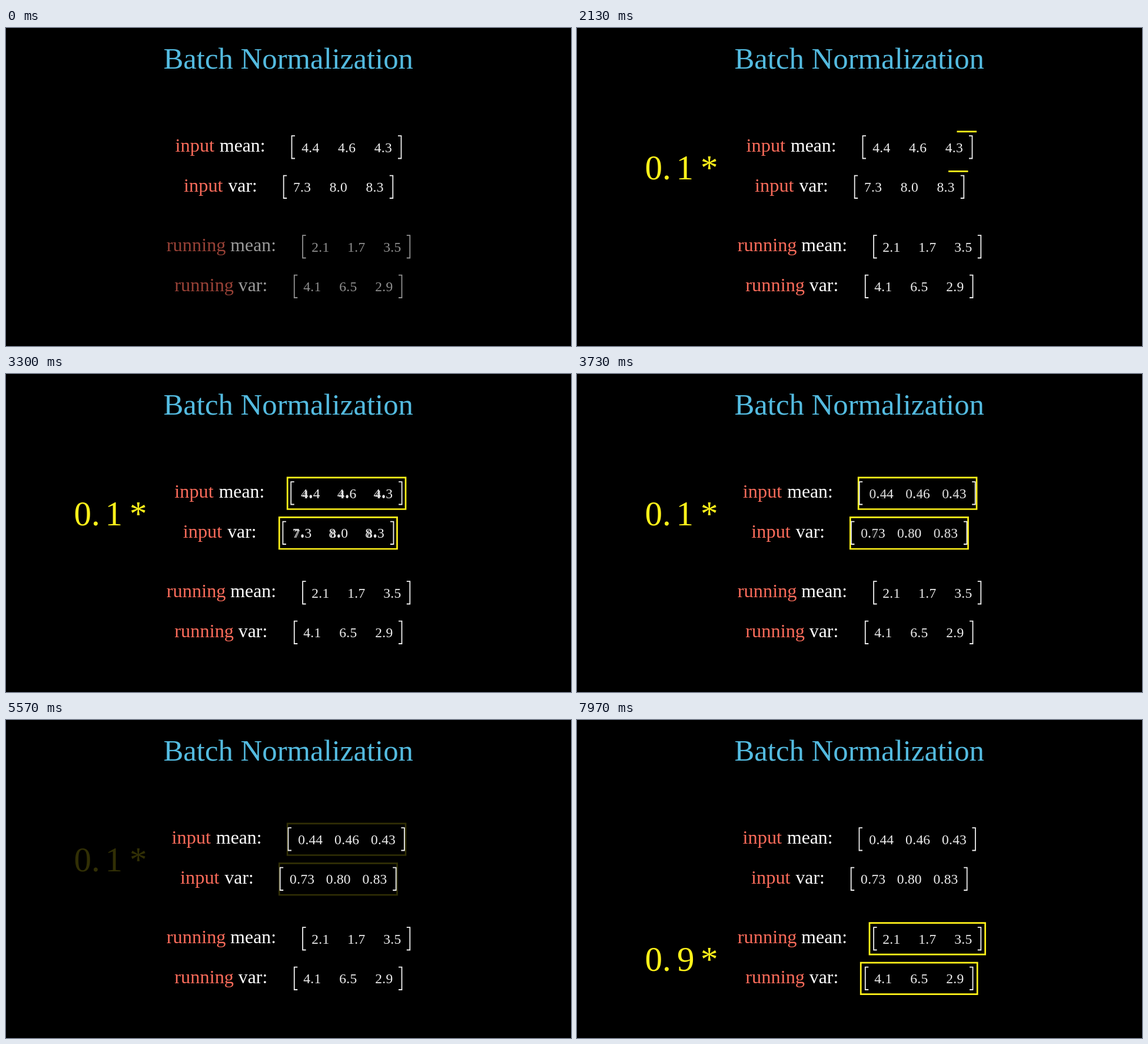
An HTML page with a canvas for the animation above (8 s loop, 960x540 px).

```html
<!DOCTYPE html>
<html lang="en">
<head>
<meta charset="utf-8">
<title>Batch Normalization</title>
<style>
  html, body { margin: 0; width: 100%; height: 100%; overflow: hidden; background: #000; }
  canvas { display: block; width: 960px; height: 540px; }
</style>
</head>
<body>
<canvas id="stage" width="960" height="540"></canvas>
<script>
const ctx = document.getElementById('stage').getContext('2d');
const LOOP = 8000;
const SERIF = '"Liberation Serif", "Times New Roman", serif';
const BLUE = '#54bbe0', RED = '#fa6b5a', YELLOW = '#fff21a', WHITE = '#fff', PALE = '#eee';
const EM = 23.5, DIGIT = EM * 0.5, DOT = EM * 0.278;

// Start times of the one-second animations
const BRIGHTEN = -70, SHOW_01 = 930, FRAME_INPUT = 1930, SCALE_INPUT = 2930,
      HIDE_01 = 4930, SHOW_09 = 5945, FRAME_RUNNING = 6930;

const inputRows = [
  { x: 287.5, y: 210, label: 'mean:', left: 484.6, right: 672.4, first: 517.2, step: 61.8,
    values: ['4.4', '4.6', '4.3'], scaled: ['0.44', '0.46', '0.43'],
    frame: [478.2, 175.8, 679, 229.5] },
  { x: 302, y: 277.5, label: 'var:', left: 470.8, right: 658.2, first: 503, step: 61.7,
    values: ['7.3', '8.0', '8.3'], scaled: ['0.73', '0.80', '0.83'],
    frame: [464.3, 243.3, 664.5, 297] }
];
const runningRows = [
  { x: 272.8, y: 379, label: 'mean:', left: 503.2, right: 687.2, first: 534.3, step: 61,
    values: ['2.1', '1.7', '3.5'], frame: [497, 344.6, 693.6, 398.2] },
  { x: 286.3, y: 446.5, label: 'var:', left: 488.9, right: 673.4, first: 520.2, step: 61,
    values: ['4.1', '6.5', '2.9'], frame: [482.2, 412.2, 680.2, 465.6] }
];

const lerp = (a, b, k) => a + (b - a) * k;
const sigmoid = x => 1 / (1 + Math.exp(-x));

// Sigmoid ease over one second, normalised to reach 0 and 1
function ease(time, start) {
  const u = Math.min(1, Math.max(0, (time - start) / 1000));
  const edge = sigmoid(-5);
  return Math.min(1, Math.max(0, (sigmoid(10 * (u - 0.5)) - edge) / (1 - 2 * edge)));
}

function text(str, x, y, size, color, align = 'left') {
  ctx.font = `${size}px ${SERIF}`;
  ctx.textAlign = align;
  ctx.fillStyle = color;
  ctx.fillText(str, x, y);
}

// Splits a number into glyphs with their centre positions
function layout(str, center) {
  const widths = [...str].map(ch => ch === '.' ? DOT : DIGIT);
  let x = center - widths.reduce((a, b) => a + b) / 2;
  return [...str].map((ch, i) => {
    x += widths[i];
    return { ch, x: x - widths[i] / 2 };
  });
}

function number(str, center, y) {
  for (const g of layout(str, center)) text(g.ch, g.x, y, EM, PALE, 'center');
}

const glyphBox = ch => ch === '.' ? { w: 2.6, h: 2.6 } : { w: 10.6, h: 15.6 };

function morphGlyph(from, to, y, k) {
  const a = glyphBox(from.ch), b = glyphBox(to.ch);
  const w = lerp(a.w, b.w, k), h = lerp(a.h, b.h, k), x = lerp(from.x, to.x, k);
  const draw = (ch, box, alpha) => {
    ctx.save();
    ctx.globalAlpha *= alpha;
    ctx.translate(x, y);
    ctx.scale(w / box.w, h / box.h);
    text(ch, 0, 0, EM, PALE, 'center');
    ctx.restore();
  };
  if (from.ch === to.ch) return draw(from.ch, a, 1);
  draw(from.ch, a, 1 - k * k);
  draw(to.ch, b, k * k);
}

function morphNumber(before, after, center, y, k) {
  const a = layout(before, center), b = layout(after, center);
  b.forEach((to, i) => morphGlyph(a[Math.floor(i * a.length / b.length)], to, y, k));
}

function bracket(x, y, dir) {
  ctx.strokeStyle = PALE;
  ctx.lineWidth = 1.8;
  ctx.beginPath();
  ctx.moveTo(x + dir * 6.4, y - 19.2);
  ctx.lineTo(x + dir * 0.9, y - 19.2);
  ctx.lineTo(x + dir * 0.9, y + 19.2);
  ctx.lineTo(x + dir * 6.4, y + 19.2);
  ctx.stroke();
}

function row(r, word, gap, k = 0) {
  const x = r.x - 6 * k, base = r.y + 0.9;
  text(word, x, r.y, 32.4, RED);
  text(r.label, x + gap, r.y, 31.8, WHITE);
  bracket(r.left - 6 * k, r.y - 7.7, 1);
  bracket(r.right + 5.4 * k, r.y - 7.7, -1);
  r.values.forEach((value, i) => {
    const center = r.first + i * r.step;
    if (k <= 0) number(value, center, base);
    else if (k >= 1) number(r.scaled[i], center, base);
    else morphNumber(value, r.scaled[i], center, base, k);
  });
}

// Traces a frame from its top right corner, each side taking a quarter
function frame([x0, y0, x1, y1], progress, alpha = 1) {
  if (progress <= 0 || alpha <= 0) return;
  const corners = [[x1, y0], [x0, y0], [x0, y1], [x1, y1], [x1, y0]];
  ctx.save();
  ctx.globalAlpha = alpha;
  ctx.strokeStyle = YELLOW;
  ctx.lineWidth = 2.7;
  ctx.beginPath();
  ctx.moveTo(x1, y0);
  for (let i = 0; i < 4; i++) {
    const part = Math.min(1, progress * 4 - i);
    if (part <= 0) break;
    const [ax, ay] = corners[i], [bx, by] = corners[i + 1];
    ctx.lineTo(lerp(ax, bx, part), lerp(ay, by, part));
  }
  if (progress >= 1) ctx.closePath();
  ctx.stroke();
  ctx.restore();
}

function factor(digit, digitX, y, alpha) {
  if (alpha <= 0) return;
  ctx.save();
  ctx.globalAlpha = alpha;
  const glyphs = [['0', 115.6], ['.', 145.1], [digit, digitX], ['*', 210]];
  for (const [ch, x] of glyphs) text(ch, x, y, 59, YELLOW);
  ctx.restore();
}

function render(t) {
  ctx.globalAlpha = 1;
  ctx.fillStyle = '#000';
  ctx.fillRect(0, 0, 960, 540);
  text('Batch Normalization', 267.4, 69, 50.8, BLUE);

  const visible = 1 - ease(t, HIDE_01);
  factor('1', 168.6, 256.5, ease(t, SHOW_01) * visible);
  factor('9', 170, 425.5, ease(t, SHOW_09));

  for (const r of inputRows) {
    frame(r.frame, ease(t, FRAME_INPUT), visible);
    row(r, 'input', 75.4, ease(t, SCALE_INPUT));
  }
  for (const r of runningRows) {
    frame(r.frame, ease(t, FRAME_RUNNING));
    ctx.globalAlpha = lerp(0.6, 1, ease(t, BRIGHTEN));
    row(r, 'running', 108.5);
    ctx.globalAlpha = 1;
  }
}

const start = performance.now();
function tick() {
  render((performance.now() - start) % LOOP);
  requestAnimationFrame(tick);
}
tick();
</script>
</body>
</html>
```
